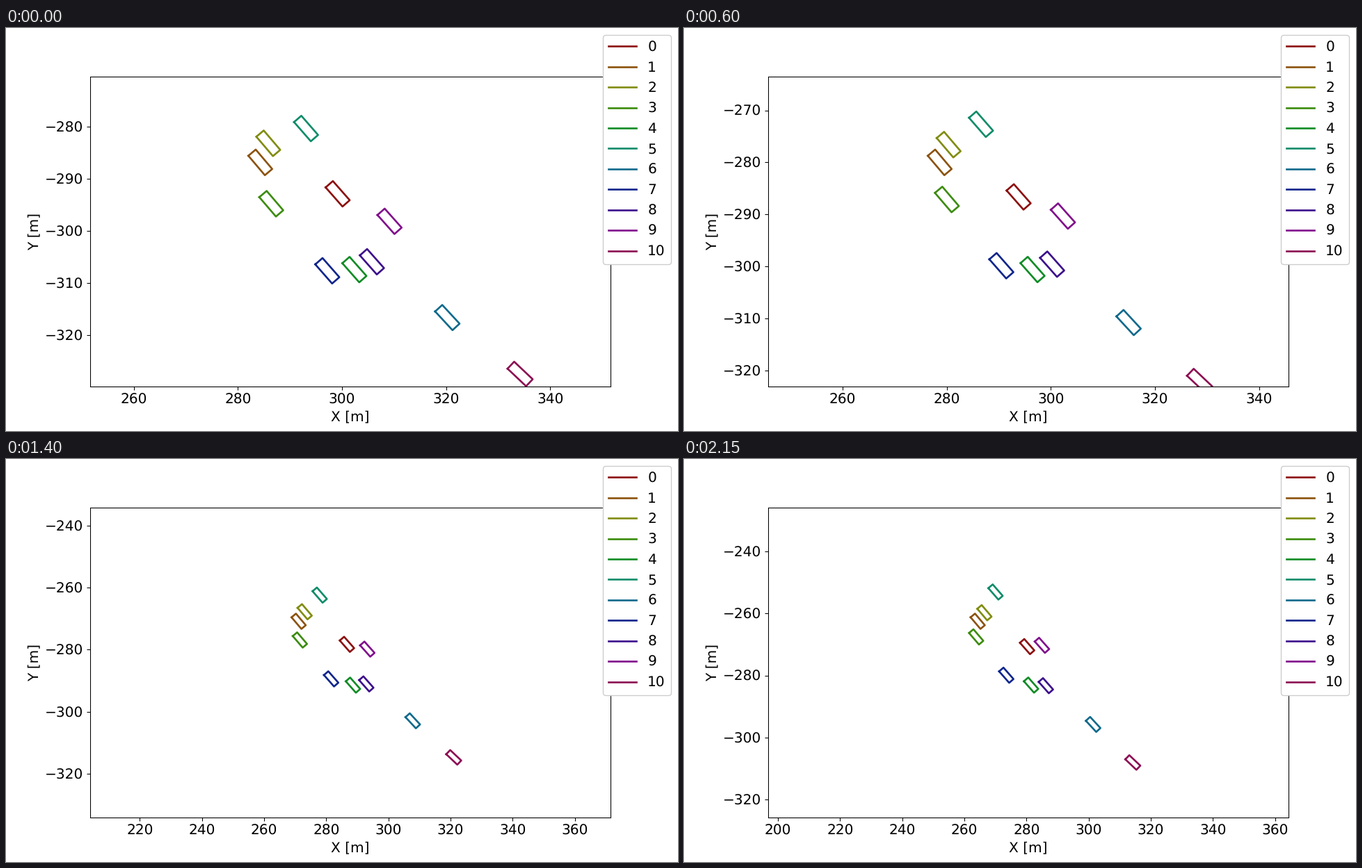
Write a matplotlib script that moves like this. It is 966 px wide and 580 px high and loops after 2.2 s.

```python
import colorsys

import matplotlib.pyplot as plt
import numpy as np
from matplotlib.animation import FuncAnimation

DPI = 96
FRAMES, INTERVAL = 44, 50
LENGTH, WIDTH = 4.9, 1.85  # car size in metres
HALF_VIEW = 50
START = np.array([301.61, -300.13])

# Each car: x and y from the convoy's start point, metres driven per loop
CARS = np.array([
    (-2.44, 7.25, 29.2),
    (-17.30, 13.29, 31.5),
    (-15.76, 16.96, 30.4),
    (-15.19, 5.34, 35.4),
    (0.77, -7.32, 32.1),
    (-8.51, 19.80, 35.7),
    (18.62, -16.54, 28.1),
    (-4.43, -7.55, 36.5),
    (4.14, -5.81, 29.9),
    (7.52, 1.96, 36.9),
    (32.59, -27.38, 27.9),
])
OFFSETS, TRAVEL = CARS[:, :2], CARS[:, 2:]


def course(x):
    """Driving direction in degrees above the negative x axis: the road bends."""
    return 49.4 - 0.03 * x - 0.00012 * x**3


def direction(degrees):
    a = np.radians(degrees)
    return np.stack([-np.cos(a), np.sin(a)], axis=-1)


courses = course(OFFSETS[:, 0])
paths = TRAVEL * direction(courses)

# Car outlines around their centres; the noses lag the course slightly
nose = direction(courses - 0.8)[:, None] * LENGTH / 2
side = direction(courses - 90.8)[:, None] * WIDTH / 2
along = np.array([1, 1, -1, -1, 1])[:, None]
across = np.array([1, -1, -1, 1, 1])[:, None]
outlines = along * nose + across * side

plt.rcParams.update({
    "font.family": "DejaVu Sans",
    "font.size": 15.1,
    "text.hinting": "none",
})
fig, ax = plt.subplots(figsize=(966 / DPI, 580 / DPI), dpi=DPI)
fig.subplots_adjust(left=0.125, right=0.9, bottom=0.11, top=0.88)
ax.set_aspect("equal", adjustable="datalim")
ax.set_xlabel("X [m]")
ax.set_ylabel("Y [m]")

lines = []
for i in range(len(CARS)):
    color = colorsys.hsv_to_rgb(i / len(CARS), 0.9, 0.55)
    lines += ax.plot([], [], lw=2, color=color, label=str(i))
fig.legend(handles=lines, loc="upper right", framealpha=1, fontsize=15.1)


def progress(frame):
    """Share of the drive done, with a short lull before the middle."""
    return np.interp(frame, [0, 12, 19, 28, 43], [0, 12.1, 18.5, 28.3, 43]) / 43


def update(frame):
    centers = START + OFFSETS + paths * progress(frame)
    for line, center, outline in zip(lines, centers, outlines):
        line.set_data(*(center + outline).T)
    # The equal aspect zooms out once the cars no longer fit the tight view
    ax.relim()
    x, y = centers.mean(axis=0)
    ax.set_xlim(x - HALF_VIEW, x + HALF_VIEW)
    ax.set_ylim(y - HALF_VIEW, y + HALF_VIEW)
    return lines


anim = FuncAnimation(fig, update, frames=FRAMES, interval=INTERVAL, repeat=True)
plt.show()
```
